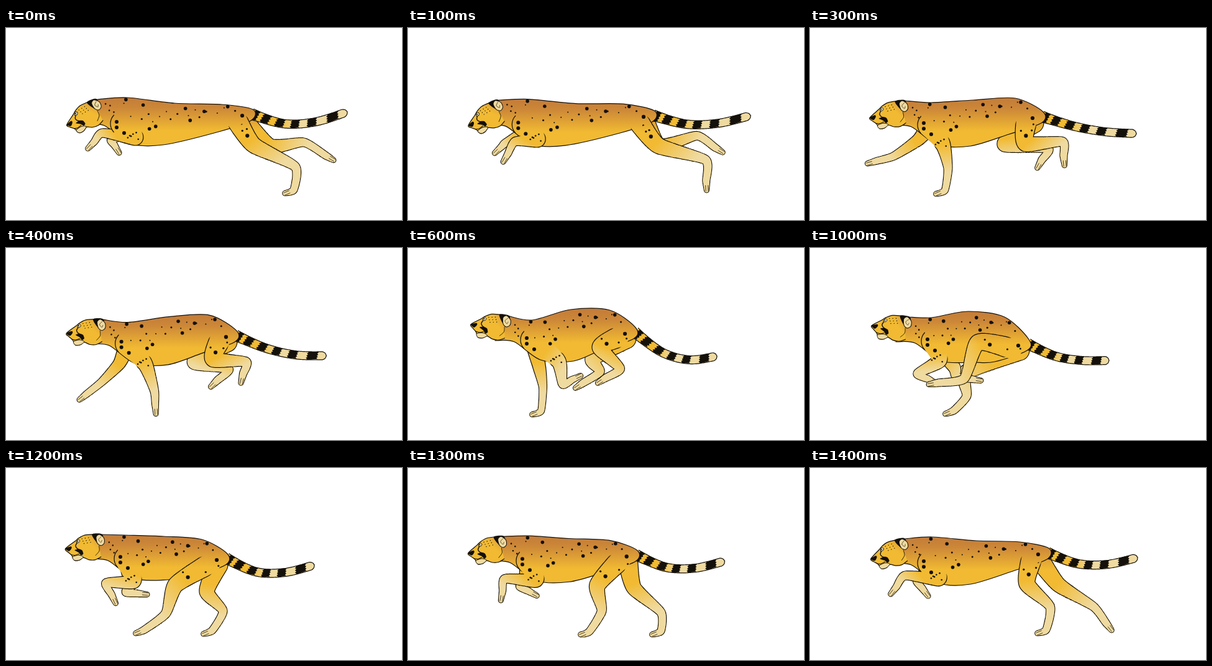
Write an HTML page with a canvas that moves like this. It is 637 px wide and 309 px high and loops after 1.5 s.

```html
<!DOCTYPE html>
<html lang="en">
<head>
<meta charset="utf-8">
<title>Running cheetah</title>
<style>
html, body { margin: 0; width: 100%; height: 100%; overflow: hidden; background: #fff; }
canvas { display: block; }
</style>
</head>
<body>
<canvas id="stage" width="637" height="309"></canvas>
<script>
const ctx = document.getElementById('stage').getContext('2d');
const INK = '#14100a', YELLOW = '#f1ba32', BROWN = '#c47c38', CREAM = '#efdaa0', CLEAR = '#efdaa000';
const STEPS = 15, STEP_MS = 100, GROUND = 272;

// Key poses of the gallop. head: ear x, y, tilt; back: heights from withers to hip;
// tail: two heights, then the tip; legs: knee (elbow), hock (wrist), ball of the paw.
const poses = [
  { at: 0, head: [145, 124, -30], back: [112, 121, 123], rump: [397, 131], tail: [154, 151, 549, 135],
    nearFore: [208, 177, 155, 169, 142, 183], farFore: [185, 170, 169, 180, 174, 188],
    nearHind: [398, 188, 465, 223, 463, 260], farHind: [425, 190, 479, 184, 514, 205] },
  { at: 3, head: [150, 126, -15], back: [120, 116, 113], rump: [375, 135], tail: [158, 167, 525, 170],
    nearFore: [214, 188, 222, 226, 217, 261], farFore: [174, 180, 135, 206, 107, 214],
    nearHind: [347, 186, 406, 183, 408, 206], farHind: [313, 187, 383, 194, 373, 212] },
  { at: 6, head: [158, 118, -1], back: [116, 99, 100], rump: [366, 128], tail: [168, 180, 497, 174],
    nearFore: [242, 182, 249, 219, 264, 212], farFore: [212, 195, 217, 225, 214, 262],
    nearHind: [309, 160, 341, 194, 318, 209], farHind: [297, 178, 309, 199, 282, 217] },
  { at: 8, head: [160, 117, -1], back: [112, 96, 104], rump: [362, 128], tail: [168, 179, 488, 180],
    nearFore: [225, 178, 200, 207, 216, 215], farFore: [247, 190, 264, 203, 284, 198],
    nearHind: [284, 148, 279, 198, 246, 215], farHind: [247, 190, 237, 221, 203, 237] },
  { at: 10, head: [156, 120, -1], back: [112, 102, 111], rump: [352, 147], tail: [174, 181, 481, 181],
    nearFore: [208, 181, 173, 202, 190, 211], farFore: [232, 192, 235, 207, 260, 211],
    nearHind: [270, 152, 248, 210, 206, 217], farHind: [251, 200, 252, 238, 232, 261] },
  { at: 12, head: [151, 116, -10], back: [108, 110, 115], rump: [356, 138], tail: [167, 168, 496, 156],
    nearFore: [205, 182, 161, 185, 170, 204], farFore: [200, 186, 193, 200, 212, 202],
    nearHind: [273, 188, 257, 234, 223, 260], farHind: [323, 199, 349, 230, 332, 261] },
  { at: 14, head: [150, 123, -20], back: [111, 117, 119], rump: [384, 129], tail: [154, 155, 527, 144],
    nearFore: [207, 178, 153, 173, 139, 191], farFore: [183, 173, 172, 182, 181, 194],
    nearHind: [349, 186, 386, 223, 380, 260], farHind: [400, 188, 456, 223, 476, 249] }
];

// Radii from the root of a leg to its toe.
const build = { nearFore: [20, 12, 7, 5.5, 4], farFore: [14, 10, 6.5, 5.5, 4],
  nearHind: [17, 13, 7.5, 6, 4], farHind: [16, 12, 7, 6, 4] };
const boldSpots = [[.19, 3], [.3, 9], [.57, 8], [.69, 12], [.84, 2], [.6, 27], [.38, 41], [.34, 46]];

const mix = (a, b, t) => a + (b - a) * t;
const clamp = (v, lo, hi) => Math.max(lo, Math.min(hi, v));
const shift = ([x, y], dx, dy) => [x + dx, y + dy];
const between = (a, b, t) => a.map((v, i) => mix(v, b[i], t));
const scatter = (i, seed) => (i * seed + .37) % 1;

// Cyclic Hermite blend of the key poses around a step.
function poseAt(step) {
  const n = poses.length;
  let i = n - 1;
  while (poses[i].at > step) i--;
  const [p, a, b, q] = [-1, 0, 1, 2].map(k => poses[(i + k + n) % n]);
  const gap = (u, v) => (v.at - u.at + STEPS) % STEPS;
  const h0 = gap(p, a), h1 = gap(a, b), h2 = gap(b, q), t = (step - a.at) / h1;
  const blend = (vp, va, vb, vq) => {
    const d0 = (va - vp) / h0, d1 = (vb - va) / h1, d2 = (vq - vb) / h2;
    const ma = (d0 * h1 + d1 * h0) / (h0 + h1) * h1;
    const mb = (d1 * h2 + d2 * h1) / (h1 + h2) * h1;
    return va + t * (ma + t * (3 * (vb - va) - 2 * ma - mb + t * (2 * (va - vb) + ma + mb)));
  };
  const out = {};
  for (const key in a) {
    if (key !== 'at') out[key] = a[key].map((v, k) => blend(p[key][k], v, b[key][k], q[key][k]));
  }
  return out;
}

// Point on a smooth line through points of any dimension, t from 0 to 1.
function along(pts, t, tension) {
  const last = pts.length - 1, i = Math.min(last - 1, Math.floor(t * last)), f = t * last - i;
  const [p, a, b, q] = [-1, 0, 1, 2].map(k => pts[clamp(i + k, 0, last)]);
  return a.map((v, c) => {
    const ma = (b[c] - p[c]) * tension, mb = (q[c] - v) * tension, d = b[c] - v;
    return v + f * (ma + f * (3 * d - 2 * ma - mb + f * (ma + mb - 2 * d)));
  });
}

// Smooth path through points.
function curve(pts, closed, k = .15) {
  const n = pts.length;
  const get = i => pts[closed ? (i + n) % n : clamp(i, 0, n - 1)];
  const path = new Path2D();
  path.moveTo(...pts[0]);
  for (let i = 0; i < n - (closed ? 0 : 1); i++) {
    const [a, b, c, d] = [get(i - 1), get(i), get(i + 1), get(i + 2)];
    path.bezierCurveTo(b[0] + (c[0] - a[0]) * k, b[1] + (c[1] - a[1]) * k,
      c[0] - (d[0] - b[0]) * k, c[1] - (d[1] - b[1]) * k, c[0], c[1]);
  }
  return path;
}

function gradient(from, to, stops) {
  const g = ctx.createLinearGradient(...from, ...to);
  stops.forEach(([at, color]) => g.addColorStop(at, color));
  return g;
}

function fill(path, style) { ctx.fillStyle = style; ctx.fill(path); }

function line(path, width = 1.2) {
  ctx.strokeStyle = INK;
  ctx.lineWidth = width;
  ctx.stroke(path);
}

function dot(x, y, r) {
  ctx.fillStyle = INK;
  ctx.beginPath();
  ctx.arc(x, y, r, 0, 7);
  ctx.fill();
}

// Union of discs along a limb.
function flesh(samples, grow) {
  const path = new Path2D();
  samples.forEach(([x, y, r]) => {
    path.moveTo(x + r + grow, y);
    path.arc(x, Math.min(y, GROUND - r), r + grow, 0, 2 * Math.PI);
  });
  return path;
}

function drawLeg(root, run, radii, coat, inkFrom = 0) {
  const [knee, hock, ball] = [0, 2, 4].map(i => run.slice(i, i + 2));
  // The paw follows the foot in the air and lies flat on the ground.
  const dx = ball[0] - hock[0], dy = ball[1] - hock[1], length = Math.hypot(dx, dy) || 1;
  const flat = clamp((ball[1] - 252) / 7, 0, 1);
  const toe = shift(ball, 15 * mix(dx / length, -.95, flat), 15 * mix(dy / length, .4, flat));
  const joints = [root, knee, hock, ball, toe].map((p, i) => [...p, radii[i]]);
  const samples = Array.from({ length: 91 }, (_, i) => along(joints, i / 90, .3));
  const skin = flesh(samples, -.6);
  fill(flesh(samples.filter((_, i) => i / 90 >= inkFrom), .6), INK);
  fill(skin, coat);
  fill(skin, gradient(root, toe, [[.3, CLEAR], [.7, CREAM]]));
  for (const s of [-.15, .3]) {
    const a = between(ball, toe, 1.1), b = between(ball, toe, .5);
    const side = [(a[1] - b[1]) * s, (b[0] - a[0]) * s];
    line(curve([shift(a, ...side), shift(b, ...side)], false), .8);
  }
}

function drawTail(rump, [y1, y2, tipX, tipY]) {
  const base = shift(rump, -1, 8);
  const pts = [base, [mix(base[0], tipX, 1 / 3), y1], [mix(base[0], tipX, 2 / 3), y2], [tipX, tipY]];
  const side = (t, s) => {
    const [x, y] = along(pts, clamp(t, 0, 1), .5);
    const a = along(pts, clamp(t - .02, 0, 1), .5), b = along(pts, clamp(t + .02, 0, 1), .5);
    const angle = Math.atan2(b[1] - a[1], b[0] - a[0]);
    const half = s * (6.5 + 2.5 * (1 - t) ** 5) * Math.sqrt(clamp((1 - t) / .06, 0, 1));
    return [x - Math.sin(angle) * half, y + Math.cos(angle) * half];
  };
  const ts = Array.from({ length: 61 }, (_, i) => i / 60);
  const shape = curve([...ts.map(t => side(t, -1)), ...ts.reverse().map(t => side(t, 1))], false);
  fill(shape, gradient(base, [tipX, tipY], [[0, YELLOW], [.25, YELLOW], [.5, CREAM], [1, CREAM]]));
  ctx.save();
  ctx.clip(shape);
  for (let i = 0; i < 6; i++) {
    const mid = .05 + .1 * i + .011 * i * i, half = .031 + .004 * i, band = new Path2D();
    for (let k = 0; k <= 16; k++) {
      const s = 1 - Math.abs(k - 8) / 4, jag = k % 2 ? .008 : -.006;
      band.lineTo(...side(mid + (k <= 8 ? -half : half) + jag - .01 * s, s * 1.1));
    }
    fill(band, INK);
  }
  ctx.restore();
  line(shape);
}

function drawHead([x, y, tilt]) {
  const skull = curve([[-2, -9], [-10, -11], [-23, -12], [-33, -9], [-40, -5], [-57, 4],
    [-54, 10], [-49, 16], [-46, 25], [-38, 26], [-31, 23], [-23, 28], [-13, 30], [-3, 27]], false);
  ctx.save();
  ctx.translate(x, y);
  ctx.rotate(tilt * Math.PI / 180);
  fill(skull, gradient([-14, 6], [0, -4], [[0, YELLOW], [1, '#dc9c3a']]));
  line(skull);
  const chin = curve([[-48, 19], [-46, 25], [-38, 26], [-31, 22], [-38, 18]], true);
  fill(chin, CREAM);
  line(chin, .9);
  fill(curve([[-57, 4], [-48, 2], [-47, 5], [-52, 9]], true), INK);
  fill(curve([[-43, 9], [-36, 8], [-31, 11], [-30, 17], [-34, 19], [-37, 14]], true, .1), INK);
  line(curve([[-50, 15], [-44, 17], [-37, 16]], false), 1);
  line(curve([[-36, -3], [-40, 2], [-39, 6], [-35, 10]], false), 1.4);
  const eye = curve([[-38, -3], [-35, -7], [-32, -5], [-34, -2]], true);
  fill(eye, '#f3ead0');
  line(eye, .9);
  dot(-35.5, -4.5, 1);
  line(curve([[-3, 9], [-4, 17], [-11, 23]], false), .8);
  fill(curve([[-11, -11], [3, -10], [6, -5], [-4, -4], [-5, 4]], true), INK);
  const ear = curve([[-5, -6], [1, -9], [7, -2], [6, 6], [0, 9], [-5, 4]], true);
  fill(ear, CREAM);
  line(ear, 1);
  line(curve([[3, -5], [-2, -1], [1, 4], [3, 1]], false), .6);
  for (let i = 0; i < 9; i++) {
    dot(-28 + 5 * (i % 3) + i / 3, -7 + 4 * Math.floor(i / 3), .7);
    if (i < 4) dot(14 + 5 * (i % 2), 6 + 6 * i, 1.3);
  }
  ctx.restore();
}

function drawSpots(pose, spine, torso, shoulder, hip) {
  const ear = pose.head, [rumpX, rumpY] = pose.rump;
  const onFlank = (u, depth, r) => {
    const x = mix(ear[0], rumpX, u), i = Math.max(1, spine.findIndex(p => p[0] > x));
    const [a, b] = [spine[i - 1], spine[i]];
    dot(x, mix(a[1], b[1], (x - a[0]) / (b[0] - a[0])) + depth, r);
  };
  ctx.save();
  ctx.clip(torso);
  boldSpots.forEach(([u, depth]) => onFlank(u, depth, 2.8));
  for (let i = 0; i < 17; i++) onFlank(.16 + .78 * scatter(i, .618), 4 + 30 * scatter(i, .414), 1 + .5 * (i % 2));
  ctx.restore();

  for (let i = 0; i < 3; i++) dot(shoulder[0] - 10 + 6 * i * (i - 1), shoulder[1] - 3 + 9 * i, 3);
  const elbow = pose.nearFore.slice(0, 2), knee = pose.nearHind.slice(0, 2);
  for (let i = 0; i < 6; i++) dot(elbow[0] - 17 + 22 * scatter(i, .618), elbow[1] - 9 + 14 * scatter(i, .414), 1.3);
  dot(rumpX - 17, rumpY + 10, 3.1);
  dot(...between(hip, knee, .65), 3.1);
  dot(...shift(between(hip, knee, .3), 9, 4), 1.6);
  dot(...shift(between(hip, knee, .65), -8, -8), 1.6);
}

function draw(step) {
  const pose = poseAt(step), { head, rump, back } = pose;
  const ear = head.slice(0, 2), shoulder = shift(ear, 43, 30), hip = shift(rump, -27, 15);
  const spine = [shift(ear, 2, -9), ...back.map((y, i) => [mix(ear[0], rump[0], .2 + .3 * i), y]), rump];
  const torso = curve([...spine, shift(rump, -3, 18), shift(rump, -55, 36), shift(ear, 108, 64),
    shift(ear, 55, 62), shift(ear, 13, 33), shift(ear, -18, 31)], false);
  const top = Math.min(...spine.map(p => p[1]));
  const coat = gradient([0, top], [0, top + 66], [[0, BROWN], [.25, '#cc8738'], [.8, YELLOW], [1, YELLOW]]);

  ctx.fillStyle = '#fff';
  ctx.fillRect(0, 0, 637, 309);
  ctx.lineJoin = ctx.lineCap = 'round';
  drawLeg(shift(rump, -15, 18), pose.farHind, build.farHind, coat);
  drawLeg(shoulder, pose.farFore, build.farFore, coat);
  drawTail(rump, pose.tail);
  fill(torso, coat);
  line(torso);
  drawLeg(shoulder, pose.nearFore, build.nearFore, coat, .22);
  const blade = new Path2D();
  blade.arc(...shoulder, 20, 2.4, 3.9);
  line(blade);
  drawLeg(hip, pose.nearHind, build.nearHind, coat, .06);
  drawSpots(pose, spine, torso, shoulder, hip);
  drawHead(head);
}

function tick() {
  draw(Math.floor(performance.now() / STEP_MS) % STEPS);
  requestAnimationFrame(tick);
}
tick();
</script>
</body>
</html>
```
